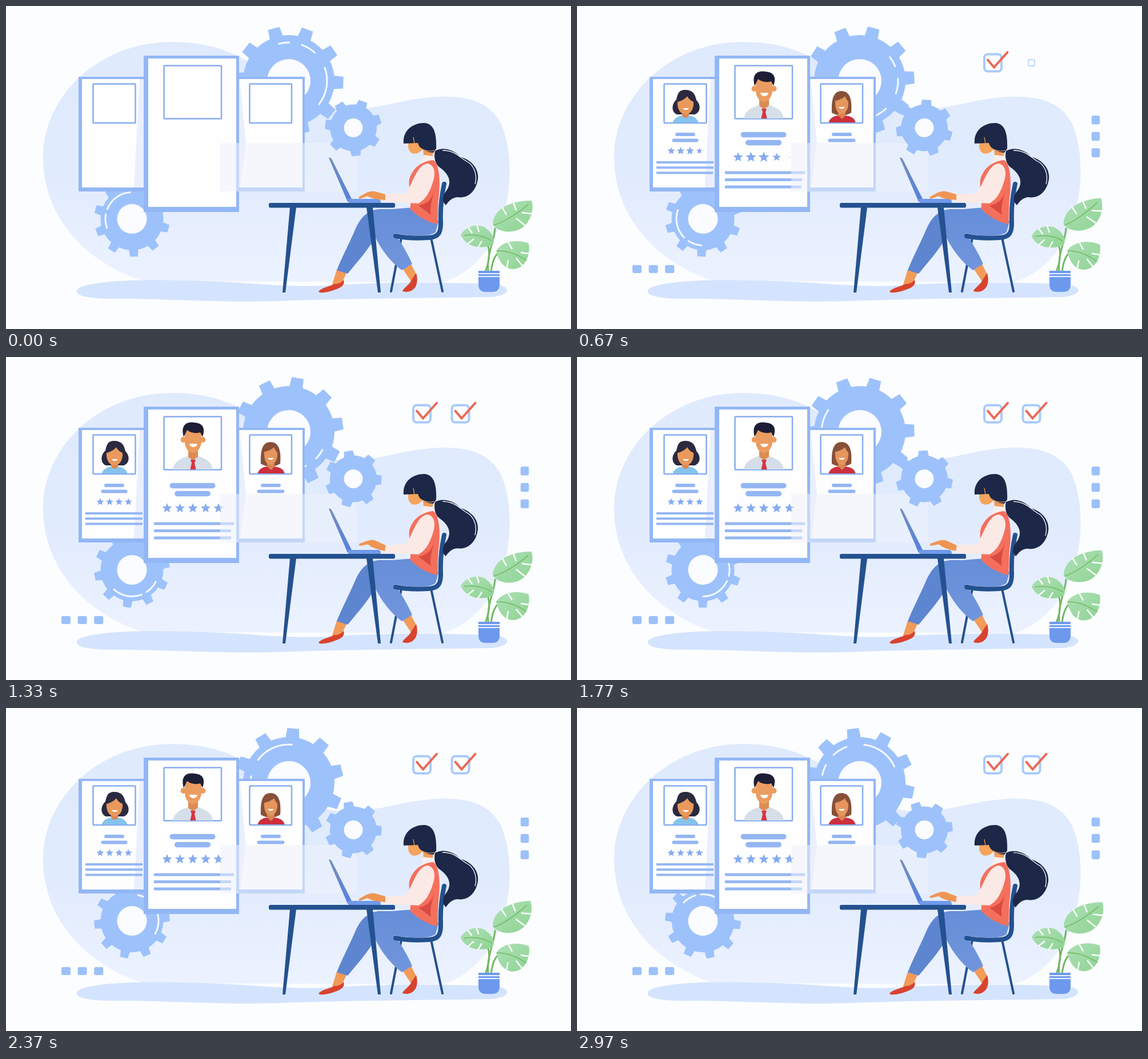
These frames come from a looping animation (989x566 px, 3010 ms). An HTML page:

```html
<!DOCTYPE html>
<html lang="en">
<head>
<meta charset="utf-8">
<title>Candidate review</title>
<style>
html, body { margin: 0; width: 100%; height: 100%; overflow: hidden; background: #fcfdfe; }
svg { display: block; width: 100vw; height: 100vh; }
</style>
</head>
<body>
<svg id="stage" viewBox="0 0 989 566">
  <defs>
    <linearGradient id="sky" x1="0" y1="0" x2="0" y2="1">
      <stop offset="0" stop-color="#e0eafd"/><stop offset=".55" stop-color="#e1ebfe"/><stop offset="1" stop-color="#ecf2ff"/>
    </linearGradient>
    <linearGradient id="denim" x1="0" y1="0" x2="0" y2="1">
      <stop offset="0" stop-color="#668ed8"/><stop offset="1" stop-color="#7195dc"/>
    </linearGradient>
    <linearGradient id="leaf" x1="0" y1="0" x2="1" y2="1">
      <stop offset="0" stop-color="#aee0b6"/><stop offset="1" stop-color="#8fd494"/>
    </linearGradient>
    <linearGradient id="lid" x1="0" y1="0" x2="0" y2="1">
      <stop offset="0" stop-color="#7590be"/><stop offset="1" stop-color="#5580dc"/>
    </linearGradient>
    <clipPath id="photoL"><rect x="153" y="137" width="73" height="67"/></clipPath>
    <clipPath id="photoM"><rect x="277" y="105" width="99" height="92"/></clipPath>
    <clipPath id="photoR"><rect x="427" y="137" width="72" height="67"/></clipPath>
  </defs>

  <path fill="url(#sky)" d="M65 265C65 160 160 63 290 63C400 63 440 110 520 160C580 196 640 178 690 168C780 150 840 156 866 205C888 255 884 325 870 370C850 432 810 470 765 484L240 482C140 450 65 370 65 265Z"/>
  <path fill="#d5e4fe" d="M124 499C126 486 200 478 300 481C420 482 480 494 560 490C660 483 780 484 860 488C885 492 884 507 850 510C740 512 600 512 480 517C360 520 270 512 190 513C140 513 122 507 124 499Z"/>

  <g id="gears"></g>

  <g id="cardL">
    <path fill="#93b7f5" d="M127 124H250V325H127Z"/><path fill="#fefeff" d="M133 128H250V318H133Z"/>
    <path fill="#e9effd" d="M234 128H250V318H224Z"/>
  </g>
  <g id="cardR">
    <path fill="#93b7f5" d="M403 124H523V325H403Z"/><path fill="#fefeff" d="M403 128H519V318H403Z"/>
    <path fill="#e9effd" d="M403 128H409L420 240L410 318H403Z"/>
  </g>
  <path fill="#93b7f5" d="M241 87H408V361H241Z"/><path fill="#fefeff" d="M249 92H403V352H249Z"/>
  <g fill="#fff" stroke="#86adf0" stroke-width="2.5">
    <rect x="152.500" y="136.500" width="74" height="68.500" rx="1"/>
    <rect x="276.500" y="104.500" width="100.500" height="93" rx="1"/>
    <rect x="426.500" y="136.500" width="73.500" height="68.500" rx="1"/>
  </g>

  <g clip-path="url(#photoL)"><g class="portrait">
    <path fill="#2b2a3f" d="M189 147C177 147 176 156 174 164C165 172 165 186 175 190H206C217 186 217 173 209 165C207 155 203 147 189 147Z"/>
    <path fill="#db8850" d="M184 180H196V198H184Z"/>
    <path fill="#85c3ed" d="M167 206C169 196 178 193 184 192Q190 200 196 192C203 193 211 196 213 206Z"/>
    <path fill="#e9995b" d="M176 168C184 166 190 162 193 158C196 164 200 166 204 168C205 180 199 190 190 190C181 190 175 180 176 168Z"/>
    <path fill="#fff" d="M185 179H196A6 5 0 0 1 185 179Z"/>
  </g></g>
  <g clip-path="url(#photoM)"><g class="portrait">
    <path fill="#dc8c53" d="M319 158H336V182H319Z"/>
    <path fill="#d5dee9" d="M292 199C293 184 305 178 318 174L327 181L337 174C350 178 361 184 362 199Z"/>
    <path fill="#d7353f" d="M323 180H332L330 186L333 199H322L325 186Z"/>
    <g fill="#eb9c60"><circle cx="310.500" cy="145" r="5"/><circle cx="344.500" cy="145" r="5"/>
    <path d="M313 128H342V148C342 160 334 168 327.500 168C320 168 313 160 313 148Z"/></g>
    <path fill="#1d1e36" d="M311 140C305 118 317 113 330 115C346 116 349 126 344 140L340 132C331 135 322 132 317 128Z"/>
    <path fill="#fff" d="M321 152H335A7 6 0 0 1 321 152Z"/>
  </g></g>
  <g clip-path="url(#photoR)"><g class="portrait">
    <path fill="#885039" d="M463 149C449 149 445 163 446 187Q463 197 480 187C482 163 477 149 463 149Z"/>
    <path fill="#d98350" d="M457 180H470V198H457Z"/>
    <path fill="#cc2f3e" d="M440 206C442 196 449 193 457 192L464 198L470 192C480 193 487 197 488 206Z"/>
    <path fill="#e5955d" d="M452 166C460 165 466 161 469 158C471 163 474 166 475 168C476 180 470 189 463 189C456 189 451 180 452 166Z"/>
    <path fill="#fff" d="M458 177H469A6 5 0 0 1 458 177Z"/>
  </g></g>

  <g id="resume"></g>
  <rect x="375" y="240" width="239" height="85" fill="#eff2fb" opacity=".55"/>
  <g id="frontGear"></g>
  <g id="floaters"></g>

  <g id="plant">
    <g fill="none" stroke="#72b864" stroke-width="3" stroke-linecap="round">
      <path d="M844 466C841 435 854 415 856 390"/><path d="M849 466C852 440 860 428 874 428"/><path d="M839 466C849 440 848 420 836 404"/>
    </g>
    <g id="leafTop">
      <path fill="url(#leaf)" d="M852 383C852 362 874 341 920 341C926 360 915 386 895 393C880 398 862 396 852 383Z"/>
      <path fill="none" stroke="#fcfdfe" stroke-width="2.500" d="M868 352L876 366M888 344L893 358M920 364L903 362M908 384L893 372"/>
      <path fill="none" stroke="#72b864" stroke-width="1.500" d="M854 384Q880 376 914 348"/>
    </g>
    <g id="leafLeft">
      <path fill="url(#leaf)" d="M796 401C806 383 832 380 843 392C856 402 856 418 850 419C834 426 806 424 796 401Z"/>
      <path fill="none" stroke="#fcfdfe" stroke-width="2.500" d="M809 388L816 398M824 383L828 396M808 417L819 408M826 423L833 412"/>
      <path fill="none" stroke="#72b864" stroke-width="1.500" d="M851 412Q830 398 802 402"/>
    </g>
    <g id="leafRight">
      <path fill="url(#leaf)" d="M858 429C868 412 895 408 915 416C919 440 906 462 886 461C872 460 862 447 858 429Z"/>
      <path fill="none" stroke="#fcfdfe" stroke-width="2.500" d="M879 414L886 426M916 434L901 432M904 455L893 442M877 458L879 445"/>
      <path fill="none" stroke="#72b864" stroke-width="1.500" d="M859 429Q885 428 911 446"/>
    </g>
    <path fill="#6c99ed" d="M827 464H864V488Q864 501 851 501H840Q827 501 827 488Z"/>
    <path fill="#edf3ff" d="M827 468H864V470H827ZM827 473H864V475H827Z"/>
  </g>

  <g fill="none" stroke="#24518f" stroke-linecap="round">
    <path stroke-width="4" d="M692 406L674 500M744 406L764 500"/>
  </g>
  <path fill="#f29b59" d="M579 462L596 468L588 485L570 491ZM694 460L709 452L719 472L710 484Z"/>
  <g fill="#d8432f">
    <path d="M547 500C556 492 566 492 575 487Q584 488 591 480C594 489 586 494 576 497Q562 503 549 502Z"/>
    <path d="M718 468C723 486 717 500 701 501L694 500C696 493 705 491 711 478Z"/>
  </g>
  <path fill="#5e85d0" d="M700 356H655C635 357 622 368 612 390C600 418 588 440 579 463L598 469C618 445 640 420 652 395C670 384 700 385 700 356Z"/>
  <path fill="url(#denim)" d="M757 378C752 362 725 352 700 354L650 358C640 358 636 366 638 380C641 402 664 442 693 463L711 452C704 435 692 415 680 398C700 403 742 406 752 396Z"/>
  <path fill="none" stroke="#24518f" stroke-width="8" stroke-linecap="round" d="M682 403C700 407 725 407 740 406C758 405 761 396 761 380C760 355 763 330 767 312"/>

  <g id="tail">
    <path fill="#1d2747" d="M751 254C765 246 784 252 795 264C815 270 828 285 826 303C823 325 808 338 790 335C780 336 775 342 770 349C762 342 764 332 772 322C783 304 770 290 758 282C750 275 749 262 751 254Z"/>
    <path fill="none" stroke="#fcfdfe" stroke-width="1.300" d="M764 253C788 253 796 268 811 275C821 284 825 298 821 312"/>
  </g>
  <path fill="#f29b59" d="M730 246L748 254L746 268L731 266Z"/>
  <path fill="#f7eeee" d="M731 261L749 263L750 273L726 277Z"/>
  <path fill="#f4705d" d="M748 270C757 276 761 300 758 330C755 350 757 366 755 382C742 380 722 371 707 355C711 342 704 320 706 304C711 286 725 272 748 270Z"/>
  <path fill="#d94a40" d="M750 322C746 338 738 347 722 350L744 366C741 352 746 340 750 322Z"/>
  <path fill="#fbe9e5" d="M737 276C749 277 753 291 748 306C742 326 735 339 722 346L663 343V330L700 328C712 311 719 279 737 276Z"/>
  <path fill="#f5a45d" d="M704 236V247C706 260 716 261 724 256L736 246L728 234Z"/>
  <path fill="#1d2747" d="M696 241C694 220 710 205 732 205C750 206 754 225 753 250L748 257C734 256 724 251 721 240Z"/>
  <path fill="none" stroke="#f5a45d" stroke-width="1.200" d="M713 230L715 241M724 248Q736 257 750 253"/>

  <path fill="url(#lid)" d="M565 266Q568 264 571 270L606 340L598 343Z"/>
  <path fill="#7099ea" d="M598 338H652Q656 338 656 345H600Z"/>
  <path id="hand" fill="#ef9553" d="M664 330L646 325C638 323 632 326 617 335L619 338L633 333C640 338 650 339 664 340Z"/>
  <g fill="#24518f">
    <rect x="460" y="345" width="221" height="8.500" rx="3"/>
    <path d="M497 353H508L489 502H484ZM631 353H642L656 502H651Z"/>
  </g>
</svg>
<script>
const LOOP = 3010, STEP = 100 / 3, LAST = 89, SPIN = 0.1;
const BAR = '#94b6f3';
const $ = id => document.getElementById(id);
const clamp = v => Math.max(0, Math.min(1, v));
const span = (t, start, length) => clamp((t - start) / length);
const easeOut = p => 1 - (1 - p) ** 3;
const backOut = p => 1 + 2.7 * (p - 1) ** 3 + 1.7 * (p - 1) ** 2;
const updates = [];

function add(parent, tag, attrs) {
  const el = document.createElementNS('http://www.w3.org/2000/svg', tag);
  for (const key in attrs) el.setAttribute(key, attrs[key]);
  return parent.appendChild(el);
}

// Angles are degrees clockwise from straight up.
function polar(r, deg) {
  const a = deg * Math.PI / 180;
  return (r * Math.sin(a)).toFixed(2) + ' ' + (-r * Math.cos(a)).toFixed(2);
}

function addGear(parent, g) {
  const group = add(parent, 'g', {});
  let d = '';
  for (let i = 0; i < g.teeth; i++) {
    const a = g.phase + i * 360 / g.teeth;
    const next = a + 360 / g.teeth - g.base;
    d += `${i ? 'L' : 'M'}${polar(g.body, a - g.base)}L${polar(g.outer, a - g.tip)}L${polar(g.outer, a + g.tip)}` +
      `L${polar(g.body, a + g.base)}A${g.body} ${g.body} 0 0 1 ${polar(g.body, next)}`;
  }
  add(group, 'path', { d: d + 'Z', fill: '#9dc2fb' });
  add(group, 'circle', { r: g.hole, fill: '#fbfcff' });
  for (const [from, to] of g.shine) {
    add(group, 'path', {
      d: `M${polar(g.glow, from)}A${g.glow} ${g.glow} 0 0 1 ${polar(g.glow, to)}`,
      fill: 'none', stroke: '#f4f9ff', 'stroke-width': 3, 'stroke-linecap': 'round'
    });
  }
  updates.push(t => group.setAttribute('transform', `translate(${g.x} ${g.y}) rotate(${g.dir * SPIN * t})`));
}

addGear($('gears'), { x: 495, y: 131, teeth: 10, phase: 20, body: 80, outer: 96, base: 8.5, tip: 6.2,
  hole: 38, glow: 67, dir: 1, shine: [[-15, 1], [20, 43], [70, 128]] });
addGear($('gears'), { x: 220.5, y: 373, teeth: 10, phase: 33, body: 55, outer: 66.5, base: 8.5, tip: 6,
  hole: 26, glow: 46.5, dir: -1, shine: [[250, 280], [292, 356]] });
addGear($('frontGear'), { x: 608, y: 213.5, teeth: 7, phase: 20, body: 41, outer: 50, base: 13, tip: 9,
  hole: 16.5, glow: 0, dir: -1, shine: [] });

function popAt(el, x, y, start, length, ease) {
  updates.push(t => el.setAttribute('transform', `translate(${x} ${y}) scale(${ease(span(t, start, length))})`));
}

function addName(x, y, w, h, start) {
  const bar = add($('resume'), 'rect', { x: -w / 2, y: -h / 2, width: w, height: h, rx: h / 2, fill: BAR });
  popAt(bar, x, y, start, 400, easeOut);
}

function addLine(x, y, w, h, start) {
  const line = add($('resume'), 'rect', { x, y: y - h / 2, height: h, fill: BAR });
  updates.push(t => line.setAttribute('width', w * easeOut(span(t, start, 400))));
}

function addStar(x, y, r, start) {
  const points = Array.from({ length: 10 }, (_, i) => polar(i % 2 ? r * 0.44 : r, i * 36));
  const star = add($('resume'), 'polygon', { points: points.join(' '), fill: '#86acf0' });
  popAt(star, x, y, start, 250, backOut);
}

[[189.5, 35, 46, 6, 225, 235.5], [326.5, 80, 63, 9.5, 225.5, 239.5], [463.5, 35, 48, 6, 225, 235.5]]
  .forEach(([x, top, bottom, h, y1, y2]) => {
    addName(x, y1, top, h, 195);
    addName(x, y2, bottom, h, 258);
  });
[0, 1, 2].forEach(i => {
  const start = 195 + i * 78;
  addLine(139, 274 + i * 9.2, 100, 4, start);
  addLine(259, 292 + i * 12.5, i ? 135 : 140, 5, start);
});
for (let i = 0; i < 5; i++) addStar(282 + i * 22.5, 265, 9, 420 + i * 60);
for (let i = 0; i < 4; i++) addStar(165 + i * 16.4, 254, 6.8, 420 + i * 60);

function addSquare(x, y, w, h, start) {
  const square = add($('floaters'), 'rect', { x: -w / 2, y: -h / 2, width: w, height: h, rx: 3, fill: '#9cc1f9' });
  popAt(square, x, y, start, 330, backOut);
}
[0, 1, 2].forEach(i => {
  addSquare(908, 199.8 + i * 28.7, 14.5, 15.5, 180 + i * 95);
  addSquare(105 + i * 28.6, 461, 16, 14, 180 + i * 95);
});

function addCheckbox(x, y, boxStart, tickStart) {
  const box = add($('floaters'), 'rect', { x: -15, y: -15, width: 30, height: 30, rx: 6,
    fill: '#fdfeff', stroke: '#a8cafc', 'stroke-width': 4 });
  popAt(box, x, y, boxStart, 300, backOut);
  const tick = add($('floaters'), 'path', { d: `M${x - 9} ${y - 5}L${x + 2} ${y + 8}L${x + 26} ${y - 19}`,
    fill: 'none', stroke: '#ec6654', 'stroke-width': 4, 'stroke-linecap': 'round', pathLength: 1 });
  updates.push(t => {
    const drawn = easeOut(span(t, tickStart, 250));
    tick.setAttribute('stroke-dasharray', `${drawn} 2`);
    tick.setAttribute('visibility', drawn ? 'visible' : 'hidden');
  });
}
addCheckbox(728, 99.5, 120, 480);
addCheckbox(795.5, 99.5, 640, 1020);

const portraits = document.querySelectorAll('.portrait');
updates.push(t => {
  const drop = 95 * (1 - easeOut(span(t, 0, 300)));
  portraits.forEach(p => p.setAttribute('transform', `translate(0 ${drop})`));
});

function turn(id, angle, x, y) {
  updates.push(t => $(id).setAttribute('transform', `rotate(${angle(t)} ${x} ${y})`));
}
const wave = (t, period) => 2 * Math.PI * t / period;
const sway = t => (1 - Math.cos(wave(t, 1400))) / 2;
turn('leafTop', t => -4 * sway(t), 852, 385);
turn('leafLeft', t => -2.5 * sway(t), 850, 416);
turn('leafRight', t => 2 * sway(t), 858, 429);
turn('tail', t => 1.5 * Math.max(0, Math.sin(wave(t, 1300))), 752, 256);
turn('hand', t => 9 * clamp(6 * Math.cos(wave(t - 1438, 1970)) - 0.3), 664, 335);

const began = performance.now();
function draw() {
  const now = (performance.now() - began) % LOOP;
  const t = Math.min(LAST, Math.floor((now + 4) / STEP)) * STEP;
  updates.forEach(update => update(t));
  requestAnimationFrame(draw);
}
draw();
</script>
</body>
</html>
```
